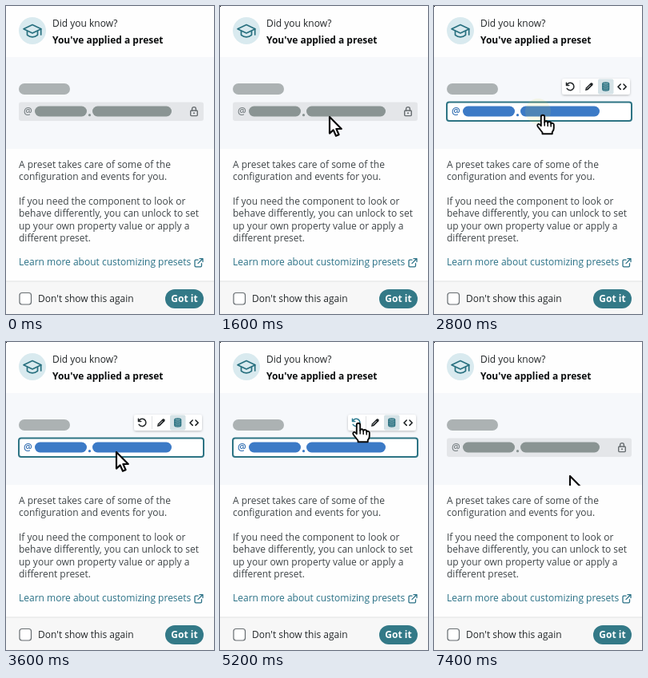
An HTML page for the animation above (7.6 s loop, 260 by 386 pixels).

```html
<!DOCTYPE html>
<html lang="en">
<head>
<meta charset="utf-8">
<title>Preset tip</title>
<style>
  html, body { margin: 0; width: 100%; height: 100%; overflow: hidden; background: #fefefe; }
  svg { display: block; width: 260px; height: 386px; }
  text { font: 12px "Open Sans", "Noto Sans", sans-serif; fill: #3f4548; }
  .bold { font-weight: 700; }
  .line { fill: none; stroke-linecap: round; stroke-linejoin: round; }

  /* Everything runs on one 7.6 s clock with hard changes */
  .dot, .locked, .unlocked, .tint, .tint-at, .arrow, .arrow-path, .hand, .hand-path, .reset, .click, .glow {
    animation: 7600ms step-end infinite;
  }
  .dot { animation-name: dot; }
  .locked { animation-name: locked; }
  .unlocked { animation-name: unlocked; }
  .tint { animation-name: tint; }
  .tint-at { animation-name: tint-at; }
  .arrow { animation-name: arrow; }
  .arrow-path { animation-name: arrow-path; }
  .hand { animation-name: hand; }
  .hand-path { animation-name: hand-path; }
  .reset { animation-name: reset; }
  .click { animation-name: click; }
  .glow { animation-name: glow; }

  @keyframes dot { 0% { opacity: 0 } 5.26%, 100% { opacity: 1 } }
  @keyframes locked { 0%, 78.94%, 100% { opacity: 1 } 34.21% { opacity: 0 } }
  @keyframes unlocked { 0%, 78.94%, 100% { opacity: 0 } 34.21% { opacity: 1 } }
  @keyframes tint { 0%, 78.94%, 100% { fill: #8a9493 } 34.21% { fill: #3c7ac6 } }
  @keyframes tint-at { 0%, 78.94%, 100% { fill: #777f82 } 34.21% { fill: #2f6cb0 } }
  @keyframes arrow {
    0%, 23.68%, 63.15%, 89.47% { opacity: 0 }
    5.26%, 47.36%, 78.94%, 97.36%, 100% { opacity: 1 }
  }
  @keyframes arrow-path {
    0% { transform: translate(163px, 170px) }
    5.26% { transform: translate(163px, 170px); animation-timing-function: steps(5, end) }
    18.42% { transform: translate(137px, 139px) }
    47.36% { transform: translate(138px, 138px); animation-timing-function: steps(4, end) }
    57.89% { transform: translate(167px, 107px) }
    78.94% { transform: translate(171px, 103px) }
    97.36%, 100% { transform: translate(170px, 168px) }
  }
  @keyframes hand {
    0%, 47.36%, 78.94%, 100% { opacity: 0 }
    23.68%, 63.15% { opacity: 1 }
  }
  @keyframes hand-path {
    0% { transform: translate(136px, 137px) }
    63.15%, 100% { transform: translate(173px, 102px) }
  }
  @keyframes reset { 0%, 78.94%, 100% { stroke: #24282a } 65.78% { stroke: #2f7d92 } }
  @keyframes click { 0%, 39.47%, 100% { opacity: 0 } 34.21% { opacity: .12 } }
  @keyframes glow { 0%, 81.57%, 100% { opacity: 0 } 78.94% { opacity: 1 } }
</style>
</head>
<body>
<svg viewBox="0 0 260 386">
  <defs>
    <clipPath id="panel"><rect y="64" width="260" height="116"/></clipPath>
    <filter id="shadow" x="-10%" y="-30%" width="120%" height="180%">
      <feDropShadow dx="0" dy="1" stdDeviation="1.6" flood-opacity=".25"/>
    </filter>
  </defs>

  <rect width="260" height="386" fill="#fefefe"/>

  <!-- header -->
  <circle cx="33" cy="31" r="17" fill="#d9eaef"/>
  <g class="line" stroke="#28707f" stroke-width="1.7">
    <path d="M33 23.5 L44 28.7 L33 34 L22 28.7 Z"/>
    <path d="M26.5 31.5 V36.3 Q33 41.5 39.5 36.3 V31.5 M43.7 29 V36"/>
  </g>
  <text x="58" y="25.5" style="fill:#202426">Did you know?</text>
  <text x="58" y="47" class="bold" style="fill:#0c0e0f">You've applied a preset</text>

  <!-- preview -->
  <rect y="64" width="260" height="115" fill="#f6f8fb"/>
  <g class="glow" fill="#f8f4b8">
    <circle cx="146" cy="126" r="45" opacity=".18"/>
    <circle cx="172" cy="108" r="10" opacity=".5"/>
  </g>
  <rect x="16" y="97" width="64" height="14" rx="7" fill="#acb2b3"/>
  <g class="locked">
    <rect x="16" y="120.5" width="231" height="23.5" rx="3" fill="#e4e6e9"/>
    <rect x="230.7" y="131" width="8.6" height="6.6" rx="1" class="line" stroke="#666c6f" stroke-width="1.4"/>
    <path d="M232.6 131 V129 a2.4 2.4 0 0 1 4.8 0 V131" class="line" stroke="#666c6f" stroke-width="1.4"/>
    <circle cx="235" cy="134.3" r="1" fill="#666c6f"/>
  </g>
  <rect class="unlocked" x="16" y="120.5" width="231" height="23.5" rx="3" fill="#fff" stroke="#2d7484" stroke-width="2"/>
  <text x="22" y="136" class="tint-at" style="font-weight:600">@</text>
  <g class="tint">
    <rect x="36" y="125.5" width="65" height="13" rx="6.5"/>
    <circle cx="104.5" cy="136.7" r="1.6"/>
    <rect x="108" y="125.5" width="99" height="13" rx="6.5"/>
  </g>
  <circle class="click" cx="130" cy="132" r="16" fill="#d9d94a"/>

  <!-- toolbar -->
  <g class="unlocked">
    <rect x="160" y="91" width="85" height="20" rx="3" fill="#fff" filter="url(#shadow)"/>
    <rect x="205" y="91.5" width="19.5" height="19" rx="2" fill="#d6e3e7"/>
    <path d="M182.5 93 V109" stroke="#e0e3e5"/>
    <path class="line reset" stroke-width="1.5" d="M165.5 96.3 V99.6 H168.8 M165.8 99.3 A4.7 4.7 0 1 1 166.2 103.4"/>
    <path d="M189 106 L189.8 102.6 L195.8 96.6 Q197 95.6 198.2 96.8 Q199.3 98 198.3 99.2 L192.3 105.2 Z" fill="#1d2123"/>
    <path d="M191 103.7 L195.5 99.2" stroke="#fff" stroke-width=".9"/>
    <g fill="#6fa0ab" stroke="#28707f" stroke-width="1.1">
      <path d="M210.7 97.6 V104.6 a4 1.7 0 0 0 8 0 V97.6"/>
      <ellipse cx="214.7" cy="97.6" rx="4" ry="1.7"/>
      <path fill="none" d="M210.7 100 a4 1.7 0 0 0 8 0 M210.7 102.4 a4 1.7 0 0 0 8 0"/>
    </g>
    <path class="line" stroke="#1d2123" stroke-width="1.6" d="M233.2 98 L230 101.2 L233.2 104.4 M237 98 L240.2 101.2 L237 104.4"/>
  </g>

  <!-- copy -->
  <text x="16" y="203">A preset takes care of some of the</text>
  <text x="16" y="218.3">configuration and events for you.</text>
  <text x="16" y="249">If you need the component to look or</text>
  <text x="16" y="264.3">behave differently, you can unlock to set</text>
  <text x="16" y="279.6">up your own property value or apply a</text>
  <text x="16" y="294.9">different preset.</text>
  <text x="16" y="325.3" style="fill:#2a7186">Learn more about customizing presets</text>
  <path class="line" stroke="#2a7186" stroke-width="1.3" d="M240 318.2 H237.3 Q236 318.2 236 319.5 V325.5 Q236 326.8 237.3 326.8 H243.2 Q244.5 326.8 244.5 325.5 V322.6 M242 316.6 H246 V320.6 M245.8 316.8 L240 322.6"/>

  <!-- footer -->
  <rect y="345" width="260" height="41" fill="#f7f7f7"/>
  <rect y="344.5" width="260" height="1" fill="#e2e3e4"/>
  <rect x="17" y="359.5" width="14.5" height="14.5" rx="3" fill="#fff" stroke="#666c70" stroke-width="1.2"/>
  <text x="40" y="371" style="fill:#25292b">Don't show this again</text>
  <rect x="199" y="355" width="48" height="24" rx="12" fill="#337987"/>
  <text x="223" y="371" class="bold" text-anchor="middle" style="fill:#fff">Got it</text>

  <!-- pointer -->
  <g clip-path="url(#panel)" fill="#fff" stroke="#0a0a0a" stroke-linejoin="round" stroke-linecap="round">
    <g class="arrow"><path class="arrow-path" stroke-width="2.2" d="M0 0 V20.6 L4.7 16.4 L8 23.8 L11.6 22.2 L8.4 15 H14.8 Z"/></g>
    <g class="hand"><g class="hand-path" stroke-width="1.9">
      <path d="M-2.2 2 a2.2 2.2 0 0 1 4.4 0 V9 a2 2 0 0 1 4 .6 a2 2 0 0 1 4 1 a2 2 0 0 1 3.6 1 V16 q0 3 -2 5 V23.3 H-.5 V21.5 L-6 14.5 q-1.6 -2.6 .4 -3.5 q1.4 -.5 3.4 2.2 Z"/>
      <path fill="none" stroke-width="1.5" d="M2.2 9 V13 M6.2 9.6 V13.4 M10.2 10.6 V14"/>
    </g></g>
  </g>
  <rect class="dot" width="1" height="1"/>
</svg>
</body>
</html>
```
